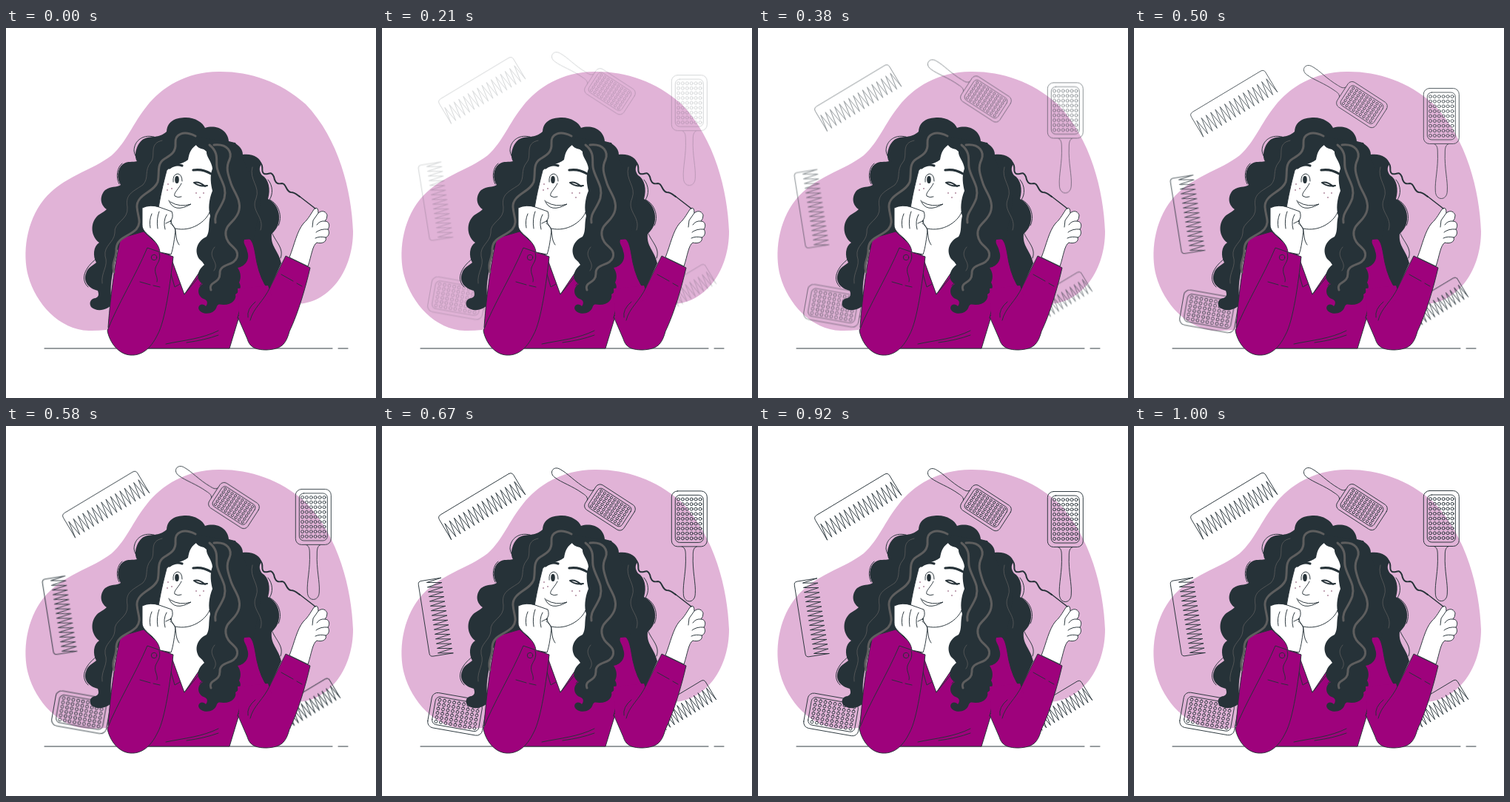
An HTML page that plays this animation: 500 by 500 pixels, repeating every 1.04 s.

```html
<!DOCTYPE html>
<html lang="en">
<head>
<meta charset="utf-8">
<title>Curly hair care</title>
<style>
  html, body { margin: 0; width: 100%; height: 100%; overflow: hidden; background: #fff; }
  svg { display: block; width: 100vw; height: 100vh; }
  .ink { fill: #263238; }
  .line { fill: none; stroke: #263238; stroke-width: .95; stroke-linecap: round; stroke-linejoin: round; }
  .shirt { fill: #9e027c; stroke: #263238; stroke-width: .95; stroke-linejoin: round; }
  .skin { fill: #fff; stroke: #263238; stroke-width: .95; stroke-linejoin: round; }
  .shine { fill: none; stroke: #5e5e5e; stroke-width: 3; stroke-linecap: round; }
  .hair { fill: none; stroke: #5e5e5e; stroke-width: .8; stroke-linecap: round; }
  .brow { stroke-width: 3.2; }
  .wink { stroke-width: 2; }
  #tools path, #tools rect, #tools circle { vector-effect: non-scaling-stroke; }
</style>
</head>
<body>
<svg viewBox="0 0 500 500">
  <path fill="#e1b3d7" d="M290 59C245 58 210 80 190 106C172 128 163 154 143 172C116 193 76 201 51 232C27 262 22 305 30 335C40 372 72 408 112 409C170 410 200 385 260 382C320 380 350 377 395 373C440 370 469 325 469 275C467 220 450 150 405 103C370 72 330 59 290 59Z"/>
  <g id="tools" class="line" opacity="0"></g>
  <path class="line" d="M52 433H441M449 433H462"/>

  <!-- hair behind the face -->
  <path class="ink" d="M217 140C218 124 232 121 243 121C256 121 266 128 269 135C284 130 300 138 301 153C312 155 320 162 320 171C333 169 345 176 345 184C341 190 343 195 346 199C355 204 358 218 354 231C365 236 370 248 369 259C368 268 364 274 359 278C357 295 368 300 372 318L355 355C345 345 332 320 322 300L300 290L180 290L150 300C145 330 138 350 144 372C138 382 122 384 115 377C111 370 116 365 121 365C125 363 126 361 124 355C112 352 104 343 108 332C110 324 117 321 122 317C117 308 118 295 126 290C115 282 114 266 121 257C125 251 131 250 136 245C126 238 127 226 134 219C142 213 149 216 155 212C149 204 150 190 158 184C165 179 171 182 177 180C172 172 177 155 186 150C196 145 206 150 217 140Z"/>
  <path class="line" d="M203 148C186 142 173 152 173 166Q174 174 181 181M157 183C150 188 148 202 153 211M122 312C106 324 100 340 111 350M359 276C365 290 376 298 371 311M354 205C361 213 361 225 356 232C369 238 374 255 368 267"/>

  <!-- neck, face, shirt -->
  <path fill="#fff" d="M224 255L222 305L241 360L275 325L286 240Z"/>
  <path fill="#fff" d="M257 158C251 163 248 166 246 178C238 185 225 184 217 193C212 212 208 230 206 244L224 256C225 268 232 272 243 271C258 268 272 258 280 247L288 200Q278 165 257 158Z"/>
  <path class="line" d="M217 193C212 212 208 230 206 244M229 271C250 276 270 262 275 249"/>
  <path class="shirt" d="M155 284L186 275L222 308L241 360L264 326L300 290L327 284C335 286 336 302 339 317Q344 340 354 353L318 380L302 433H165L138 405C140 375 146 320 155 284Z"/>
  <path class="line" d="M220 322L228 350L235 346M241 360L264 332L276 333L262 348M216 427C240 422 265 420 287 409M244 425Q268 422 287 415M313 350Q320 370 313 392"/>

  <!-- features -->
  <path class="line brow" d="M221 189Q229 183 238 186M253 192Q266 190 277 197"/>
  <ellipse class="ink" cx="231" cy="205" rx="2.8" ry="5"/>
  <path class="line" d="M226 208Q225 198 232 197Q238 198 238 207M237 210C234 217 226 223 228 227Q232 230 237 228M220 233Q227 251 250 238Q235 243 222 235"/>
  <path class="line wink" d="M254 209Q261 207 269 214M254 209Q262 215 272 213"/>
  <g fill="#b08a9f">
    <circle cx="219" cy="211" r="1"/><circle cx="224" cy="217" r="1"/><circle cx="218" cy="219" r="1"/>
    <circle cx="257" cy="223" r="1"/><circle cx="267" cy="223" r="1"/><circle cx="262" cy="229" r="1"/>
  </g>

  <!-- hair in front -->
  <path class="ink" d="M256 157C261 165 266 162 271 166C270 174 278 180 279 190C275 200 277 212 279 220C274 232 273 245 276 254C273 265 276 274 271 282C258 288 254 301 261 312Q266 316 268 320C258 328 256 340 266 346C258 350 258 362 267 366C274 368 272 374 270 376C264 370 258 376 261 381C265 388 282 388 285 376C287 372 290 374 294 374C306 374 312 366 310 360C316 356 319 350 315 344C319 336 316 328 313 324C324 322 330 312 326 302C325 294 320 292 322 286L335 285L345 230L310 155L262 148Z"/>
  <path class="shine" d="M256 146C240 138 228 143 229 156C230 168 222 172 214 177C203 184 208 196 205 208C200 222 176 225 177 242C178 256 184 262 176 272C166 282 150 283 149 298C150 312 142 316 146 330M281 158C300 156 306 168 302 178C296 190 301 200 304 210C308 222 318 232 315 246C312 262 295 264 297 280C299 296 316 296 312 310C308 322 288 318 289 332C289 346 273 342 277 354M275 158C290 170 282 182 286 192C290 206 299 215 295 230C290 245 281 250 283 263"/>
  <path class="hair" d="M211 152C192 156 203 172 196 181C186 193 194 202 185 212C170 222 161 225 164 242C166 260 145 262 147 277C146 290 132 294 134 308C139 322 128 330 130 345M333 188C328 205 344 214 338 230C330 248 350 255 344 273M282 296C270 310 290 316 281 328"/>

  <!-- resting arm -->
  <path class="shirt" d="M191 297L226 309C222 345 215 396 205 414C195 435 182 443 168 442C152 441 140 425 137 409C150 375 175 335 191 297Z"/>
  <path class="line" d="M181 343L195 347M199 348L208 350M207 304C210 313 204 318 202 324C200 332 206 337 204 343"/>
  <circle class="line" cx="200" cy="310" r="3.7"/>
  <path class="skin" d="M184 243Q195 238 207 242L224 248Q227 256 222 261L229 272C228 283 226 298 223 306L208 303C207 295 203 290 197 284C189 277 184 273 184 266Z"/>
  <path class="line" d="M197 251Q193 260 195 270M207 248Q203 258 205 271M217 252Q212 261 215 272M222 261L216 264M222 264C234 272 226 282 234 293"/>

  <!-- raised arm -->
  <path class="shirt" d="M378 308L411 324C405 350 395 385 383 410C378 428 372 434 352 435C335 435 329 430 326 420L313 390C325 378 350 362 357 350Z"/>
  <path fill="#9e027c" d="M313 352L354 348L360 365L315 389Z"/>
  <path class="line" d="M357 350C348 370 334 378 330 395M337 370Q325 380 327 391M372 333L388 342M393 345L400 349"/>
  <path class="skin" d="M383 310C390 292 393 275 402 264C409 258 413 249 417 244Q422 241 422 250C428 245 433 249 434 253Q434 258 431 261C437 261 438 268 435 272C438 276 436 282 432 283C434 289 427 292 420 290C414 294 413 307 408 322Z"/>
  <path class="line" d="M422 250L415 260L414 269M431 261Q424 260 420 266M435 272Q425 271 419 276M432 283Q424 281 418 284"/>
  <path class="line wink" d="M343 181C350 188 343 194 349 197C355 199 358 192 362 201C364 211 368 211 373 210C379 210 378 221 385 222C390 222 393 225 397 228"/>
  <path class="line" style="stroke-width:1.5" d="M396 227L418 244"/>
</svg>
<script>
const tools = document.getElementById('tools');

function brush(place) {
  let dots = '';
  for (let row = -4; row <= 4; row++)
    for (let col = -2.5; col <= 2.5; col++)
      dots += `<circle cx="${col * 5.9}" cy="${row * 6.6}" r="2"/>`;
  return `<g transform="${place}">
    <rect x="-24" y="-37.5" width="48" height="75" rx="8"/>
    <rect x="-19" y="-32" width="38" height="64" rx="6"/>${dots}
    <path d="M-10 37.5C-5 39-5 45-5 50C-4 70-9 88-8 101C-8 115 8 115 8 101C9 88 4 70 5 50C5 45 5 39 10 37.5"/></g>`;
}

function comb(place) {
  const length = 117, depth = 36, teeth = 16, step = length / teeth;
  let d = `M0 ${depth}V5Q0 0 5 0H${length - 5}Q${length} 0 ${length} 5V${depth}`;
  for (let i = teeth - 1; i >= 0; i--) d += `L${(i + .5) * step} 13L${i * step} ${depth}`;
  return `<path transform="${place}" d="${d}"/>`;
}

tools.innerHTML =
  brush('translate(415.3 125)') +
  brush('translate(308 109.6) rotate(123) scale(.83)') +
  brush('translate(101.5 388.9) rotate(-80)') +
  comb('translate(75 122) rotate(-31)') +
  comb('translate(64.7 311.4) rotate(-99) scale(.88)') +
  comb('translate(344.8 396) rotate(-31) scale(.9)');

// cubic-bezier(.36, -.01, .5, 1.38)
function ease(x) {
  const curve = (s, a, b) => 3 * (1 - s) * s * ((1 - s) * a + s * b) + s ** 3;
  let low = 0, high = 1;
  for (let i = 0; i < 24; i++) {
    const mid = (low + high) / 2;
    if (curve(mid, .36, .5) < x) low = mid; else high = mid;
  }
  return curve(low, -.01, 1.38);
}

// 25 steps per 1040 ms loop
function draw(now) {
  const step = Math.floor((now % 1040 + 3) / 41.6);
  const shown = step < 3 ? 0 : ease(Math.min(1, step / 24 + .03));
  tools.setAttribute('transform', `translate(0 ${30 * (shown - 1)})`);
  tools.setAttribute('opacity', Math.min(1, shown));
}

const start = performance.now();
function tick() {
  draw(performance.now() - start);
  requestAnimationFrame(tick);
}
tick();
</script>
</body>
</html>
```
